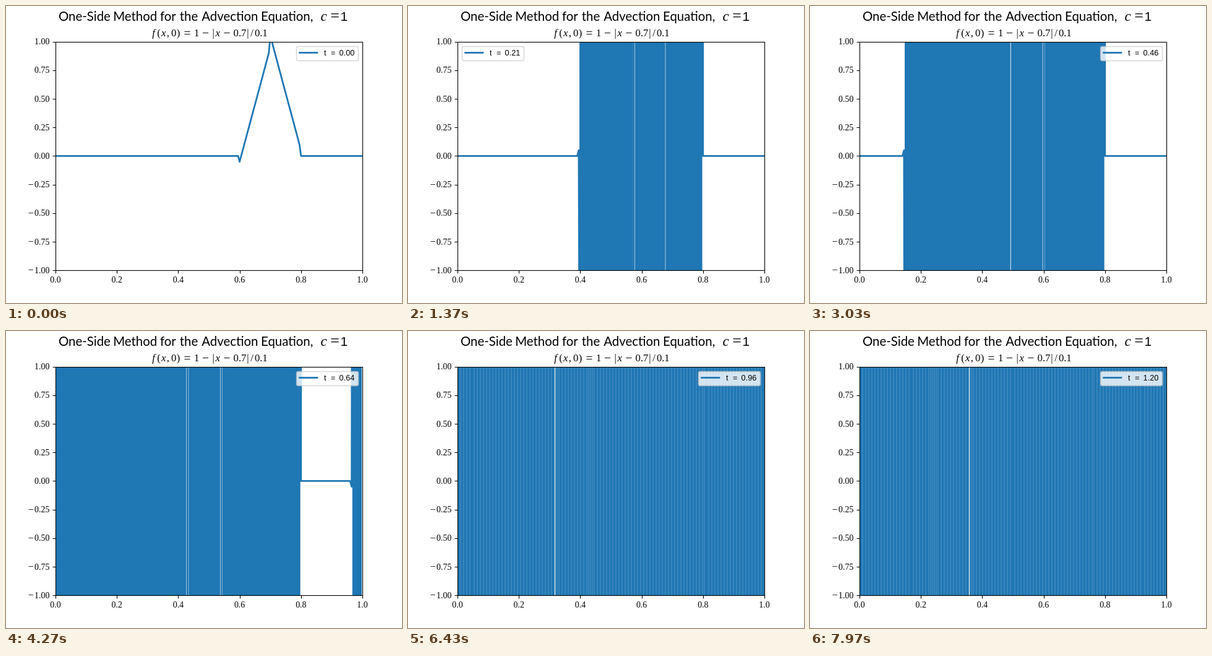
An HTML page for the animation above (8.01 s loop, 640 px wide and 480 px high).

```html
<!DOCTYPE html>
<html lang="en">
<head>
<meta charset="utf-8">
<title>One-Side Method for the Advection Equation</title>
<style>
  html, body { margin: 0; width: 100%; height: 100%; overflow: hidden; background: #fff; }
  svg { display: block; width: 640px; height: 480px; }
  .sans { font-family: "Liberation Sans", Arial, sans-serif; }
  .title { font-family: Lato, sans-serif; font-size: 20.4px; }
  .serif { font-family: "Liberation Serif", Times, serif; }
  .curve { fill: none; stroke: #1f77b4; stroke-width: 2.78; stroke-linejoin: round; stroke-linecap: square; }
  .rule { fill: none; stroke: #000; stroke-width: 1.11; }
</style>
</head>
<body>
<svg viewBox="0 0 640 480">
  <defs><clipPath id="plot"><rect x="80" y="58" width="496" height="369"/></clipPath></defs>
  <rect width="640" height="480" fill="#fff"/>
  <g clip-path="url(#plot)"><path id="wave" class="curve"/></g>
  <path id="ticks" class="rule"/>
  <rect class="rule" x="80.5" y="58.5" width="496" height="369"/>
  <g id="labels"></g>
  <g id="legend">
    <rect x="469.5" y="65.5" width="100" height="23" rx="2.78" fill="#fff" stroke="#ccc" stroke-width="1.39" opacity="0.8"/>
    <path class="curve" d="M474.6 75.5H502.9"/>
    <g class="sans" font-size="12.7">
      <text x="514" y="80">t</text>
      <text x="528.8" y="80" text-anchor="middle">=</text>
      <text id="clock" x="538.6" y="80"></text>
    </g>
  </g>
</svg>
<script>
const CELLS = 201, STEPS = 240, DT = 0.005, LOOP = 8010;
const get = id => document.getElementById(id);
const px = j => 80 + 2.48 * j;
const py = u => 242.4 - 184.8 * u;
const snap = v => Math.floor(v + 0.5) + 0.5;

function addText(x, y, text, size, options = {}) {
  const node = document.createElementNS("http://www.w3.org/2000/svg", "text");
  const attrs = { x, y, "font-size": size, class: "serif", ...options };
  for (const [key, value] of Object.entries(attrs)) node.setAttribute(key, value);
  node.textContent = text;
  get("labels").append(node);
}

function drawAxes() {
  let d = "";
  for (let i = 0; i <= 5; i++) {
    const x = px(40 * i);
    d += `M${snap(x)} 427.5v5`;
    addText(x, 447.3, (i / 5).toFixed(1), 13.89, { "text-anchor": "middle" });
  }
  for (let i = -4; i <= 4; i++) {
    const y = py(i / 4);
    d += `M80.5 ${snap(y)}h-5`;
    addText(70.4, y + 4.6, Math.abs(i / 4).toFixed(2), 13.89, { "text-anchor": "end" });
    if (i < 0) addText(40.3, y + 5, "−", 16, { "text-anchor": "middle" });
  }
  get("ticks").setAttribute("d", d);
}

function drawTitles() {
  const words = [["One-Side", 85], ["Method", 173.2], ["for", 249], ["the", 280.8],
    ["Advection", 316.2], ["Equation,", 412.1]];
  for (const [word, x] of words) addText(x, 24.2, word, 20.4, { class: "title" });
  addText(508.5, 24.2, "c", 23, { "font-style": "italic" });
  addText(531.5, 24.2, "=", 26, { "text-anchor": "middle" });
  addText(540.5, 24.2, "1", 21, { class: "sans" });

  // Centre of each symbol, in ems from the left end of the formula
  const symbols = [["f", 0.3], ["(", 0.8], ["x", 1.27], [",", 1.7], ["0", 2.25], [")", 2.7],
    ["=", 3.56], ["1", 4.48], ["−", 5.34], ["|", 6.09], ["x", 6.51], ["−", 7.41],
    ["0.7", 8.66], ["|", 9.44], ["/", 9.83], ["0.1", 10.72]];
  for (const [symbol, em] of symbols) {
    const wide = "=−".includes(symbol);
    addText(233.6 + em * 16.67, wide ? 50 : 49.4, symbol, wide ? 19.5 : 16.67, {
      "text-anchor": "middle",
      "font-style": "fx".includes(symbol) ? "italic" : "normal"
    });
  }
}

// Forward difference at Courant number 1 on a periodic grid
const advance = u => u.map((v, j) => 2 * v - u[(j + 1) % CELLS]);

function solve() {
  let u = Array.from({ length: CELLS }, (_, j) => Math.max(0, 1 - Math.abs(j - 140) / 20));
  return Array.from({ length: STEPS }, () => (u = advance(u)));
}

// Limits a segment to the height of the stage, null if it lies outside
function clipSegment(x0, y0, x1, y1) {
  const low = -1, high = 481;
  if (Math.max(y0, y1) < low || Math.min(y0, y1) > high) return null;
  const limit = (x, y) => {
    const edge = Math.min(high, Math.max(low, y));
    return edge === y ? [x, y] : [x0 + (x1 - x0) * ((edge - y0) / (y1 - y0)), edge];
  };
  return [...limit(x0, y0), ...limit(x1, y1)];
}

function wavePath(u) {
  const segments = [];
  for (let j = 0; j + 1 < CELLS; j++) {
    const s = clipSegment(px(j), py(u[j]), px(j + 1), py(u[j + 1]));
    if (s) segments.push(s);
  }
  // Only when every stroke is upright or level do they sit on whole pixels
  const straight = segments.every(([x0, y0, x1, y1]) =>
    Math.abs(x0 - x1) < 1e-4 || Math.abs(y0 - y1) < 1e-4);
  const place = straight ? snap : v => +v.toFixed(3);
  let d = "", end = "";
  for (const s of segments) {
    const [x0, y0, x1, y1] = s.map(place);
    const start = `${x0} ${y0}`;
    if (start !== end) d += `M${start}`;
    end = `${x1} ${y1}`;
    d += `L${end}`;
  }
  return d;
}

const states = solve();
let shown = -1;

function render(ms) {
  const step = Math.min(STEPS - 1, Math.floor((Math.floor(ms / 10) + 0.4) * 0.3));
  if (step === shown) return;
  shown = step;
  get("wave").setAttribute("d", wavePath(states[step]));
  get("clock").textContent = (step * DT).toFixed(2);
  const onLeft = step >= 4 && step < 78;
  get("legend").setAttribute("transform", `translate(${onLeft ? -382 : 0})`);
}

drawAxes();
drawTitles();
const began = performance.now();
function tick() {
  render((performance.now() - began) % LOOP);
  requestAnimationFrame(tick);
}
tick();
</script>
</body>
</html>
```
